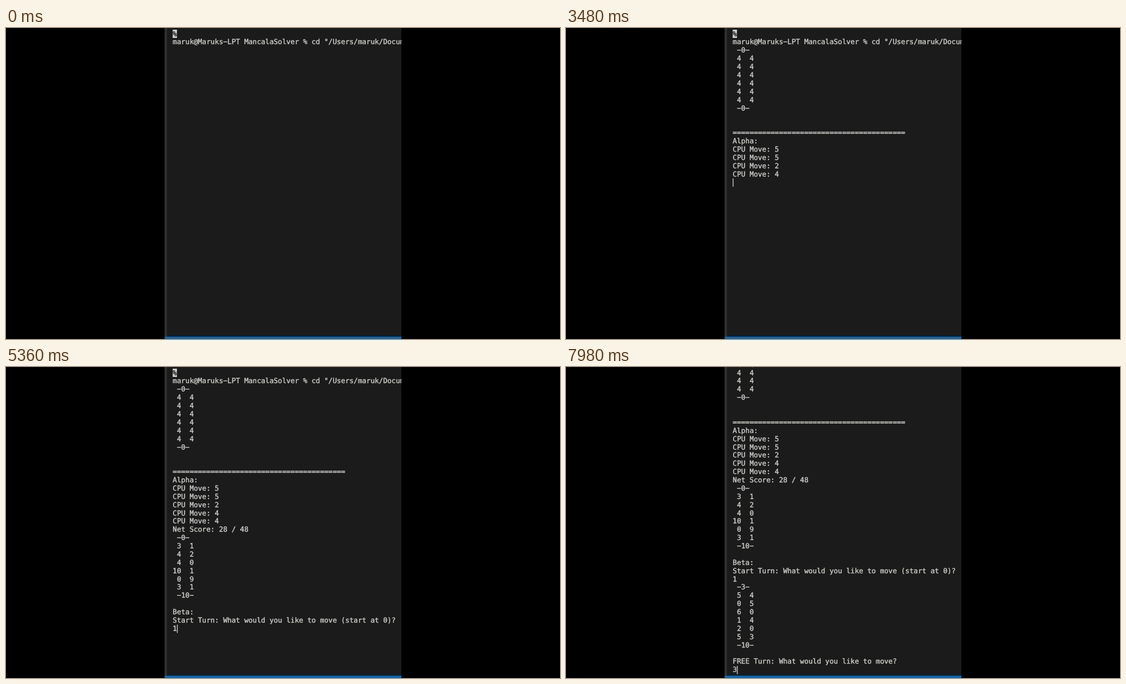
Animation of 998 by 561 pixels, one loop 8 s. Source, as an HTML page:

```html
<!DOCTYPE html>
<html lang="en">
<head>
<meta charset="utf-8">
<title>Mancala terminal</title>
<style>
html, body { margin: 0; width: 100%; height: 100%; overflow: hidden; background: #000; }
svg { display: block; width: 100%; height: 100%; }
text {
  font: 12.6px "DejaVu Sans Mono", monospace;
  fill: #cbcbc8; stroke: #cbcbc8; stroke-width: .4;
  white-space: pre; text-rendering: geometricPrecision;
}
text.inverse { fill: #1b1b1b; stroke: #1b1b1b; }
</style>
</head>
<body>
<svg viewBox="0 0 998 561">
  <defs><clipPath id="pane"><rect x="285.5" width="427" height="561"/></clipPath></defs>
  <rect width="998" height="561" fill="#000"/>
  <g clip-path="url(#pane)">
    <rect x="285.5" width="427" height="561" fill="#1b1b1b"/>
    <rect x="285.5" width="4.5" height="561" fill="#303030"/>
    <g id="screen">
      <rect x="300.3" y="3" width="7.7" height="15" fill="#cbcbc8"/>
    </g>
    <rect id="cursor" width="1.4" height="15" fill="#cbcbc8"/>
    <rect x="285.5" y="556.8" width="427" height="4.2" fill="#0569bd"/>
  </g>
</svg>
<script>
const LOOP = 8000, LEFT = 300.3, CHAR = 7.585, LINE = 14.88, MID = 10.6, ROWS = 37, BLINK = 600;
const screen = document.getElementById("screen");
const cursor = document.getElementById("cursor");

const store = n => ` \u2212${n}\u2212`;
const board = (top, pits, bottom) => [
  store(top),
  ...pits.map(([a, b]) => `${String(a).padStart(2)}  ${b}`),
  store(bottom), ""
];
const cpu = n => `CPU Move: ${n}\n`;
const print = (...lines) => lines.join("\n") + "\n";

// [time, text appended to the terminal]
const events = [
  [-600, print("%", 'maruk@Maruks\u2212LPT MancalaSolver % cd "/Users/maruk/Documents"')],
  [1000, print(...board(0, Array(6).fill([4, 4]), 0), "", "=".repeat(41), "Alpha:")],
  [1900, cpu(5)],
  [2300, cpu(5)],
  [2800, cpu(2)],
  [3200, cpu(4)],
  [4000, cpu(4) + print("Net Score: 28 / 48",
    ...board(0, [[3, 1], [4, 2], [4, 0], [10, 1], [0, 9], [3, 1]], 10),
    "Beta:", "Start Turn: What would you like to move (start at 0)?")],
  [5300, "1"],
  [5700, "\n"],
  [6300, print(...board(3, [[5, 4], [0, 5], [6, 0], [1, 4], [2, 0], [5, 3]], 10),
    "FREE Turn: What would you like to move?")],
  [7600, "3"]
];

const rows = events.map(e => e[1]).join("").split("\n").map((line, i) => {
  const el = document.createElementNS("http://www.w3.org/2000/svg", "text");
  el.setAttribute("x", LEFT);
  el.setAttribute("y", MID + i * LINE + 4);
  if (i === 0) el.setAttribute("class", "inverse");
  return screen.appendChild(el);
});

function draw(t) {
  const past = events.filter(e => e[0] <= t);
  const lines = past.map(e => e[1]).join("").split("\n");
  rows.forEach((el, i) => {
    const s = lines[i] || "";
    if (el.textContent !== s) el.textContent = s;
  });

  const last = lines.length - 1;
  const scroll = Math.max(0, lines.length - ROWS);
  screen.setAttribute("transform", `translate(0 ${-scroll * LINE})`);

  const idle = t - past[past.length - 1][0];
  cursor.setAttribute("x", LEFT + lines[last].length * CHAR);
  cursor.setAttribute("y", MID + (last - scroll) * LINE - 7.2);
  cursor.setAttribute("visibility", idle % (2 * BLINK) < BLINK ? "visible" : "hidden");
}

const start = performance.now();
function tick() {
  draw((performance.now() - start) % LOOP);
  requestAnimationFrame(tick);
}
tick();
</script>
</body>
</html>
```
